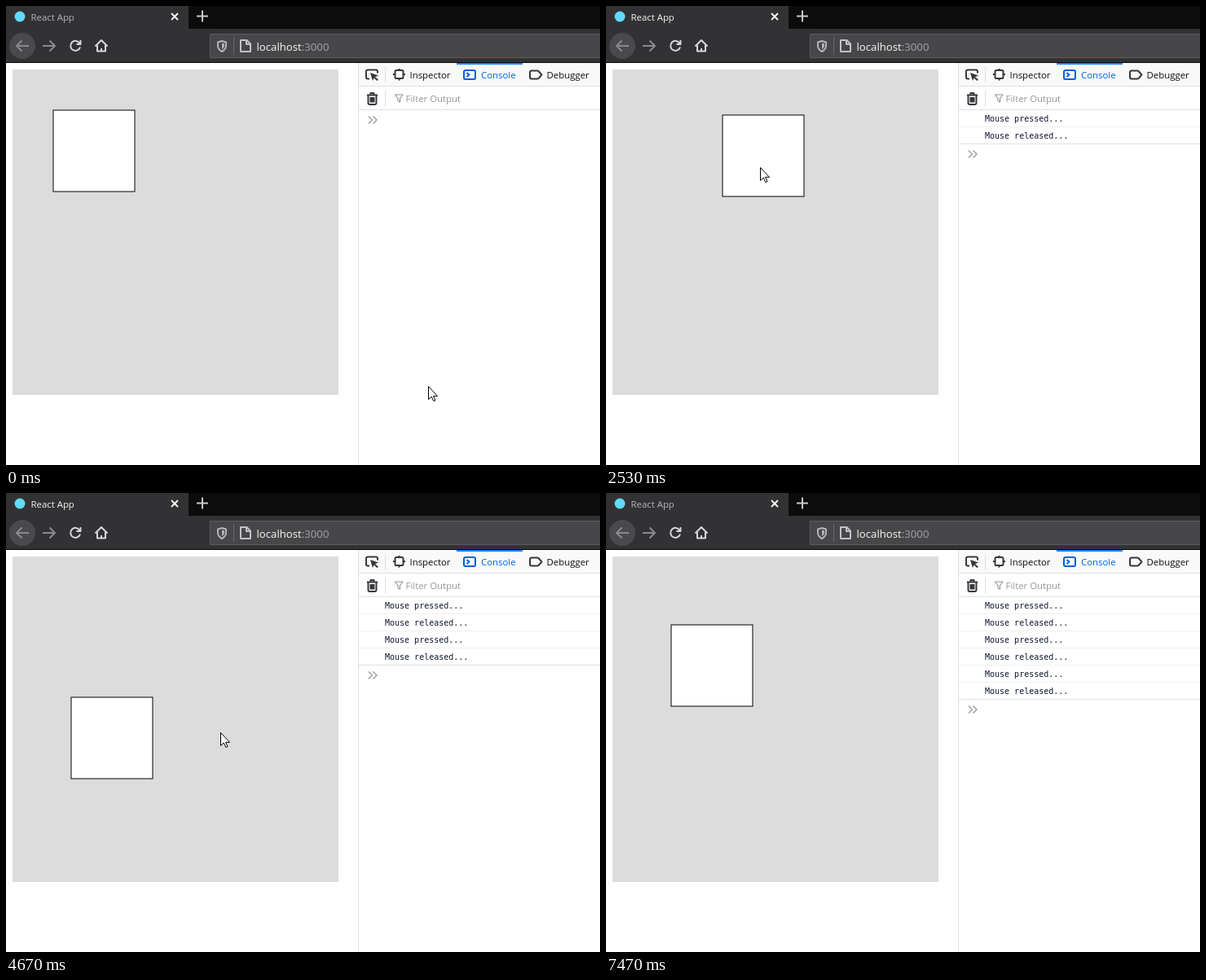
Write an HTML page that moves like this. It is 729 px wide and 564 px high and loops after 7540 ms.

```html
<!DOCTYPE html>
<html lang="en">
<head>
<meta charset="utf-8">
<title>Drag the square</title>
<style>
  html, body { margin: 0; width: 100%; height: 100%; overflow: hidden; background: #fff; }
  svg { display: block; }
  text { font: 11.4px "Open Sans", "Noto Sans", sans-serif; fill: #0c0c0d; }
  .url { font-size: 13.2px; fill: #f9f9fa; }
  .log text { font: 10px "DejaVu Sans Mono", monospace; fill: #0c1530; }
  .icon { fill: none; stroke-width: 2; stroke-linejoin: round; }
</style>
</head>
<body>
<svg width="729" height="564" viewBox="0 0 729 564">
  <!-- browser chrome -->
  <path fill="#323234" d="M0 0H729V69H0z"/>
  <path fill="#0c0c0d" d="M224 0H729V28H224zM0 69H729V70H0z"/>
  <circle cx="17" cy="13" r="6.5" fill="#61dafb"/>
  <text id="title" x="30.5" y="18">React App</text>
  <path class="icon" stroke="#f4f4f5" d="M203 9l8 8m0-8l-8 8"/>
  <path class="icon" stroke="#c8c8ca" d="M234 12.5h14m-7-7v14"/>
  <circle cx="20" cy="49" r="16" fill="#4a4a4c"/>
  <path class="icon" stroke="#8b8b8d" d="M28 49H13m6.5-6.5L13 49l6.5 6.5M45 49h15m-6.5-6.5L60 49l-6.5 6.5"/>
  <path class="icon" stroke="#d6d6d8" d="M90.5 46a6 6 0 1 0 .5 4.500M91.500 42v5h-5M109.500 49.500L117 42l7.500 7.500M112 48v7.500h10V48M117 56v-4"/>
  <path fill="#474749" stroke="#5b5b5d" d="M250.5 34.500H740v29H250.500z"/>
  <path class="icon" stroke="#b6b6b8" d="M265 43l5 1.500v4q0 5-5 7.500-5-2.500-5-7.500v-4z"/>
  <path fill="#b6b6b8" d="M265 45.500l3 1v2q0 3-3 5z"/>
  <path stroke="#68686a" d="M279.5 38v22"/>
  <path class="icon" stroke="#c2c2c4" stroke-width="1.6" d="M289.500 42h6l4.500 4.500V56h-12V42zM295 42.500V47h4.500"/>
  <text class="url" x="307.5" y="54.500">localhost<tspan fill="#a4a4a6">:3000</tspan></text>

  <!-- page -->
  <path fill="#dcdcdc" d="M8 78h400v400H8z"/>
  <rect id="square" width="100" height="100" fill="#fff" stroke="#000"/>

  <!-- developer tools -->
  <path fill="#f9f9fa" d="M433 70h296v28H433z"/>
  <path fill="none" stroke="#e0e0e2" d="M432.500 70v494M433 98.500h296M433 127.500h296M465.500 74v20M465.500 104v20"/>
  <path fill="#0a84ff" d="M553 70h81v2h-81z"/>
  <path class="icon" stroke="#38383d" d="M446 89.500h-2q-2 0-2-2v-7q0-2 2-2h10q2 0 2 2v2"/>
  <path fill="#38383d" d="M447 82l10 3.500-4 1.700 4 3.300-1.500 1.500-4-3.500-1.500 3.500z"/>
  <path class="icon" stroke="#38383d" d="M479 79h7q1.500 0 1.500 1.500v7q0 1.500-1.500 1.500h-7q-1.500 0-1.500-1.500v-7q0-1.500 1.500-1.500zM482.500 77v2m0 10v2.500M475 84h2.500m10 0h2.500"/>
  <rect class="icon" x="562" y="79" width="14" height="11" rx="2" stroke="#0060df"/>
  <path class="icon" stroke="#0060df" stroke-width="1.500" d="M565.500 82l3 2.500-3 2.500"/>
  <path class="icon" stroke="#38383d" d="M645 79.500h7q1 0 1.500.500l4 4.500-4 4.500q-.5.500-1.500.500h-7q-2 0-2-2v-6q0-2 2-2z"/>
  <text x="495.500" y="89">Inspector</text>
  <text x="583" y="89" fill="#0060df" style="fill:#0060df">Console</text>
  <text x="663.500" y="89">Debugger</text>
  <path class="icon" stroke="#38383d" stroke-width="1.500" d="M443 109.500h13M447.500 109v-2h4v2M444.500 110v9q0 2 2 2h6q2 0 2-2v-9M447.500 112v6.500m2-6.500v6.500m2-6.500v6.500"/>
  <path class="icon" stroke="#98989a" style="stroke-width:1.200" d="M477.500 109h9.500l-3.500 4.500v4.500l-2.500-1.500v-3z"/>
  <text x="490.500" y="118" style="fill:#98989a">Filter Output</text>
  <g id="log" class="log"></g>
  <path id="prompt" class="icon" stroke="#a2a2a4" style="stroke-width:1.600" d="M445 135.500l4.500 4.500-4.500 4.500m5.500-9l4.500 4.500-4.500 4.500"/>

  <path id="cursor" fill="#fff" stroke="#000" d="M.5.5v16l3.700-3.500 2.600 5.500 2.200-1-2.500-5.200h5z"/>
</svg>
<script>
  const LOOP = 7540, FPS = 15;
  const $ = id => document.getElementById(id);

  const linear = u => u;
  const easeIn = u => u * u;
  const easeOut = u => u * (2 - u);
  const smooth = u => u * u * (3 - 2 * u);

  // Keys: [tick, x, y, easing towards this key]; a tick is 1/15 s.
  const cursorPath = [
    [0, 518, 467], [6, 70, 203, smooth], [9, 104, 192, smooth],
    [24, 104, 192], [28, 189, 198, smooth],
    [52, 189, 198], [56, 156, 254, easeIn], [60, 126, 315, easeOut],
    [67, 126, 315], [70, 263, 294, linear], [75, 318, 297, easeOut],
    [85, 318, 297], [89, 315, 246, easeIn], [92, 318, 208, easeOut],
    [102, 318, 208], [107, 115, 545, easeIn], [108, 60, 620, linear]
  ];
  const squarePath = [
    [24, 58, 128], [28, 143, 134, smooth],
    [52, 143, 134], [56, 118, 174, easeIn], [60, 80, 251, easeOut],
    [85, 80, 251], [89, 77, 207, easeIn], [92, 80, 162, easeOut]
  ];
  const logTicks = [19, 38, 49, 67, 79, 98];

  function position(path, tick) {
    const next = path.findIndex(key => key[0] > tick);
    if (next < 0) return path[path.length - 1].slice(1, 3);
    if (next === 0) return path[0].slice(1, 3);
    const [t0, x0, y0] = path[next - 1];
    const [t1, x1, y1, ease = linear] = path[next];
    const u = ease((tick - t0) / (t1 - t0));
    return [x0 + (x1 - x0) * u, y0 + (y1 - y0) * u].map(Math.round);
  }

  function place(id, path, tick) {
    $(id).setAttribute("transform", `translate(${position(path, tick)})`);
  }

  function render(tick) {
    place("cursor", cursorPath, tick);
    place("square", squarePath, tick);
    $("title").style.fill = tick >= 18 && tick < 112 ? "#f5f5f6" : "#b4b4b6";

    const count = logTicks.filter(t => t <= tick).length;
    $("log").innerHTML = logTicks.slice(0, count).map((_, i) => `
      <text x="465" y="${142 + 21 * i}">Mouse ${i % 2 ? "released" : "pressed"}...</text>
      <path stroke="${i === count - 1 ? "#e0e0e2" : "#f0f0f2"}" d="M433 ${148.5 + 21 * i}h296"/>`).join("");
    $("prompt").setAttribute("transform", `translate(0 ${21 * count})`);
  }

  let lastTick = -1;
  function loop() {
    const time = performance.now() % LOOP;
    // Ticks fall on whole hundredths of a second.
    const tick = Math.floor((Math.floor(time / 10) * 10 + 5) * FPS / 1000);
    if (tick !== lastTick) render(lastTick = tick);
    requestAnimationFrame(loop);
  }
  loop();
</script>
</body>
</html>
```
